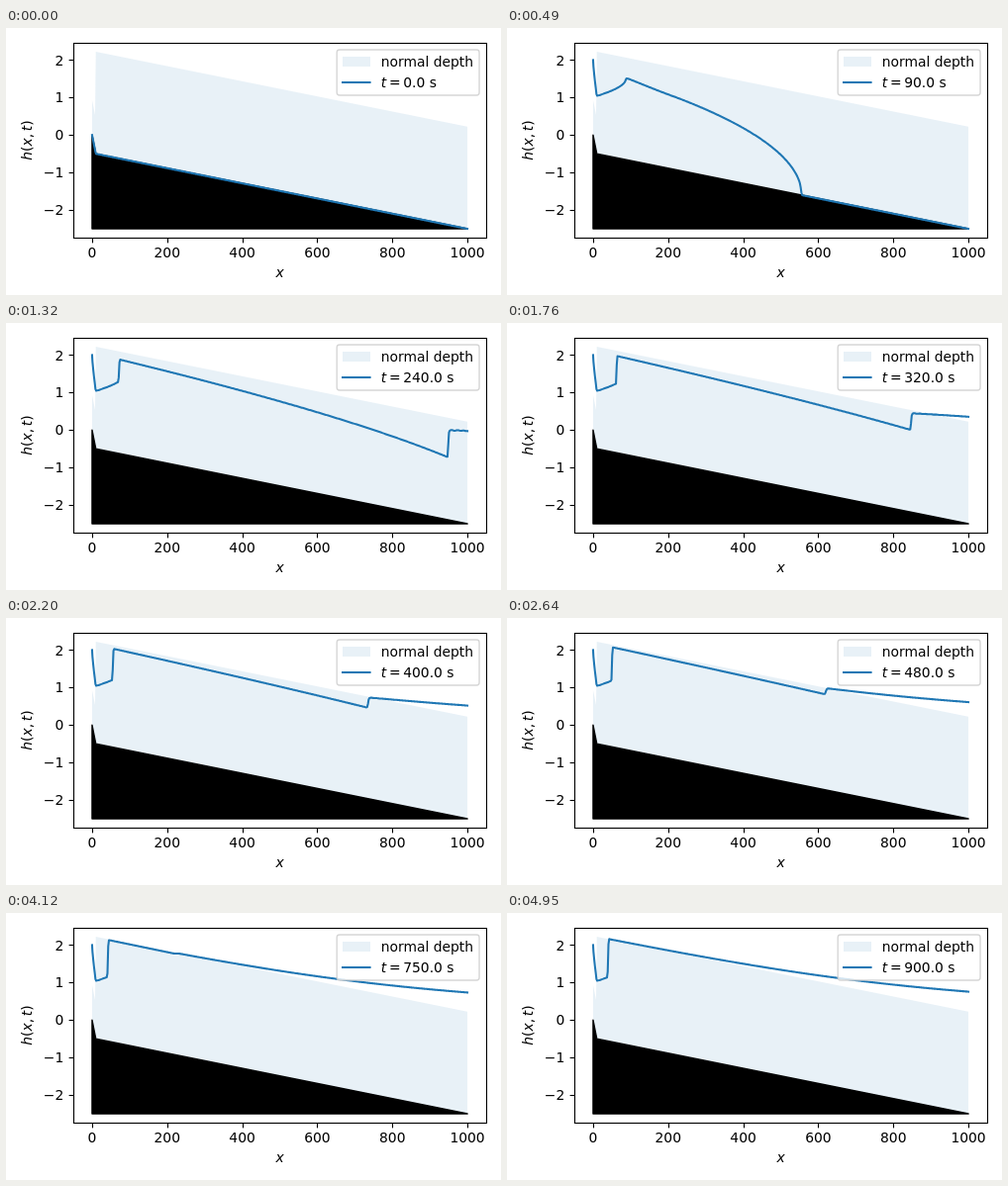
An HTML page with a canvas for the animation above (5010 ms loop, 500x270 px).

```html
<!DOCTYPE html>
<html lang="en">
<head>
<meta charset="utf-8">
<title>Channel flow over a weir</title>
<style>
  html, body { margin: 0; width: 100%; height: 100%; overflow: hidden; background: #fff; }
  canvas, svg { position: absolute; left: 0; top: 0; display: block; }
  text { font: 13.89px "DejaVu Sans", sans-serif; fill: #000; white-space: pre; }
  .it { font-style: italic; }
</style>
</head>
<body>
<canvas id="plot" width="500" height="270"></canvas>
<svg id="labels" width="500" height="270" viewBox="0 0 500 270"></svg>
<script>
// Shallow-water flow in a sloping channel, solved once at start-up
const G = 9.81, DRAG = 0.004, INFLOW = { h: 2, u: 5 }, WEIR = 0.5;
const LENGTH = 1000, CELLS = 500, DX = LENGTH / CELLS, DRY = 1e-5;
const KINK = 10, STEEP = 0.05, MILD = 2 / 990;
const FRAMES = 91, FRAME_STEP = 10, LOOP = 5010;

const bed = x => x < KINK ? -STEEP * x : -0.5 - MILD * (x - KINK);
const centre = i => (i + 0.5) * DX;
const slopeAt = Array.from({ length: CELLS }, (_, i) => centre(i) < KINK ? STEEP : MILD);
const normalDepth = slope => Math.cbrt(DRAG * (INFLOW.h * INFLOW.u) ** 2 / (G * slope));
const vanLeer = (a, b) => a * b > 0 ? 2 * a * b / (a + b) : 0;

const array = n => new Float64Array(n);
const u = array(CELLS), dh = array(CELLS), du = array(CELLS);
const massFlux = array(CELLS + 1), momFlux = array(CELLS + 1);

function setFlux(i, h, v) {
  massFlux[i] = h * v;
  momFlux[i] = h * v * v + G * h * h / 2;
}

function hllFlux(i, hL, uL, hR, uR) {
  if (hL < DRY && hR < DRY) return setFlux(i, 0, 0);
  const cL = Math.sqrt(G * hL), cR = Math.sqrt(G * hR);
  const sL = Math.min(uL - cL, uR - cR);
  const sR = hR < DRY ? uL + 2 * cL : Math.max(uL + cL, uR + cR);
  if (sL >= 0) return setFlux(i, hL, uL);
  if (sR <= 0) return setFlux(i, hR, uR);
  const qL = hL * uL, qR = hR * uR;
  const pL = qL * uL + G * hL * hL / 2, pR = qR * uR + G * hR * hR / 2;
  massFlux[i] = (sR * qL - sL * qR + sL * sR * (hR - hL)) / (sR - sL);
  momFlux[i] = (sR * pL - sL * pR + sL * sR * (qR - qL)) / (sR - sL);
}

// Critical flow over the weir, matched to the outgoing characteristic
function outletFlux(h, v) {
  const r = v + 2 * Math.sqrt(G * h);
  if (h < DRY || r <= 0) return setFlux(CELLS, 0, 0);
  let lo = r * r / (9 * G), hi = r * r / (4 * G);
  for (let k = 0; k < 26; k++) {
    const mid = (lo + hi) / 2, um = r - 2 * Math.sqrt(G * mid);
    const head = Math.max(0, mid + um * um / (2 * G) - WEIR);
    if (mid * um > Math.sqrt(G) * (2 * head / 3) ** 1.5) lo = mid; else hi = mid;
  }
  setFlux(CELLS, lo, r - 2 * Math.sqrt(G * lo));
}

function euler(h, q, dt, hNew, qNew) {
  for (let i = 0; i < CELLS; i++) u[i] = h[i] > DRY ? q[i] / h[i] : 0;
  dh[0] = vanLeer(h[0] - INFLOW.h, h[1] - h[0]);
  du[0] = vanLeer(u[0] - INFLOW.u, u[1] - u[0]);
  for (let i = 1; i < CELLS - 1; i++) {
    dh[i] = vanLeer(h[i] - h[i - 1], h[i + 1] - h[i]);
    du[i] = vanLeer(u[i] - u[i - 1], u[i + 1] - u[i]);
  }
  setFlux(0, INFLOW.h, INFLOW.u);
  for (let i = 1; i < CELLS; i++) {
    hllFlux(i, h[i - 1] + dh[i - 1] / 2, u[i - 1] + du[i - 1] / 2, h[i] - dh[i] / 2, u[i] - du[i] / 2);
  }
  outletFlux(h[CELLS - 1], u[CELLS - 1]);
  for (let i = 0; i < CELLS; i++) {
    const depth = Math.max(0, h[i] - dt / DX * (massFlux[i + 1] - massFlux[i]));
    const flow = q[i] - dt / DX * (momFlux[i + 1] - momFlux[i]) + dt * G * h[i] * slopeAt[i];
    hNew[i] = depth;
    qNew[i] = depth > DRY ? flow / (1 + dt * DRAG * Math.abs(flow) / (depth * depth)) : 0;
  }
}

function solve() {
  const h = array(CELLS), q = array(CELLS);
  const h1 = array(CELLS), q1 = array(CELLS), h2 = array(CELLS), q2 = array(CELLS);
  const depths = [h.slice()];
  for (let f = 1; f < FRAMES; f++) {
    let left = FRAME_STEP;
    while (left > 1e-9) {
      let speed = 10;
      for (let i = 0; i < CELLS; i++) {
        if (h[i] > DRY) speed = Math.max(speed, Math.abs(q[i] / h[i]) + Math.sqrt(G * h[i]));
      }
      const dt = Math.min(left, 0.42 * DX / speed);
      euler(h, q, dt, h1, q1);
      euler(h1, q1, dt, h2, q2);
      for (let i = 0; i < CELLS; i++) {
        h[i] = (h[i] + h2[i]) / 2;
        q[i] = (q[i] + q2[i]) / 2;
      }
      left -= dt;
    }
    depths.push(h.slice());
  }
  return depths;
}

// Plot
const ctx = document.getElementById("plot").getContext("2d");
const labels = document.getElementById("labels");
const BLUE = "#1f77b4", PALE = "rgba(31,119,180,0.1)";
const AXES = { left: 68, top: 15, right: 485, bottom: 212 };
const X = x => 86.95 + 0.3791 * x;
const Y = v => 203.05 - 37.93 * (v + 2.5);
const snap = p => Math.floor(p + 0.5) + 0.5;

function label(str, x, y, anchor = "start", italic = false, parent = labels) {
  const t = document.createElementNS("http://www.w3.org/2000/svg", "text");
  t.setAttribute("x", x);
  t.setAttribute("y", y);
  t.setAttribute("text-anchor", anchor);
  if (italic) t.setAttribute("class", "it");
  t.textContent = str;
  parent.appendChild(t);
  return t;
}

function path(points) {
  ctx.beginPath();
  for (const [x, v] of points) ctx.lineTo(X(x), Y(v));
}

function segment(x1, y1, x2, y2) {
  ctx.beginPath();
  ctx.moveTo(x1, y1);
  ctx.lineTo(x2, y2);
  ctx.stroke();
}

const xTicks = [0, 200, 400, 600, 800, 1000], yTicks = [-2, -1, 0, 1, 2];
const bedLine = [[0, 0], [KINK, -0.5], [LENGTH, -2.5]];
const steepDepth = normalDepth(STEEP), mildDepth = normalDepth(MILD);
const normalArea = [
  [0, steepDepth], [8, bed(8) + steepDepth], [KINK, bed(KINK) + mildDepth],
  [LENGTH, bed(LENGTH) + mildDepth], ...bedLine.slice().reverse()
];

xTicks.forEach(x => label(x, X(x), 232, "middle"));
yTicks.forEach(v => label(String(v).replace("-", "\u2212"), 58.3, Y(v) + 5.2, "end"));
label("x", 276.5, 252, "middle", true);
const yTitle = document.createElementNS("http://www.w3.org/2000/svg", "g");
yTitle.setAttribute("transform", "translate(26.3 133.7) rotate(-90)");
labels.appendChild(yTitle);
[["h", 0], ["(", 8.81], ["x", 14.23], [",", 22.45], ["t", 29.57], [")", 35.02]]
  .forEach(([s, x]) => label(s, x, 0, "start", /[a-z]/.test(s), yTitle));
label("normal depth", 378.7, 39);
label("t", 378.7, 60, "start", true);
label("=", 386.9, 60);
const clock = label("", 401.2, 60);

function drawAxes() {
  ctx.strokeStyle = "#000";
  ctx.lineWidth = 1.11;
  ctx.strokeRect(AXES.left + 0.5, AXES.top + 0.5, AXES.right - AXES.left, AXES.bottom - AXES.top);
  xTicks.forEach(x => segment(snap(X(x)), 212.5, snap(X(x)), 217.4));
  yTicks.forEach(v => segment(63.6, snap(Y(v)), 68.5, snap(Y(v))));
}

function drawLegend() {
  ctx.beginPath();
  ctx.roundRect(334.2, 21.95, 143.85, 46.1, 2.78);
  ctx.fillStyle = "rgba(255,255,255,0.8)";
  ctx.fill();
  ctx.strokeStyle = "rgba(204,204,204,0.8)";
  ctx.lineWidth = 1.39;
  ctx.stroke();
  ctx.fillStyle = PALE;
  ctx.fillRect(340, 29, 28, 10);
  ctx.strokeStyle = BLUE;
  ctx.lineWidth = 2.08;
  segment(339, 55, 368.6, 55);
}

function surface(depth, frame) {
  const points = Array.from(depth, (h, i) => [centre(i), bed(centre(i)) + h]);
  const a = points[CELLS - 2][1], b = points[CELLS - 1][1];
  return [[0, frame ? INFLOW.h : 0], ...points, [LENGTH, Math.max(bed(LENGTH), b + (b - a) / 2)]];
}

function draw(frame) {
  ctx.fillStyle = "#fff";
  ctx.fillRect(0, 0, 500, 270);

  path(normalArea);
  ctx.fillStyle = PALE;
  ctx.fill();

  path([...bedLine, [0, -2.5]]);
  ctx.closePath();
  ctx.fillStyle = ctx.strokeStyle = "#000";
  ctx.lineWidth = 1.39;
  ctx.lineJoin = "round";
  ctx.fill();
  ctx.stroke();

  path(surface(depths[frame], frame));
  ctx.strokeStyle = BLUE;
  ctx.lineWidth = 2.08;
  ctx.lineCap = "square";
  ctx.stroke();
  ctx.lineCap = "butt";
  ctx.lineJoin = "miter";

  drawAxes();
  drawLegend();
  clock.textContent = (frame * FRAME_STEP).toFixed(1) + " s";
}

// Frames alternate between 50 and 60 ms
function frameAt(ms) {
  const pair = Math.floor(ms / 110);
  return Math.min(FRAMES - 1, 2 * pair + (ms - 110 * pair >= 50 ? 1 : 0));
}

const depths = solve();
const start = performance.now();
let shown = -1;

function tick() {
  const frame = frameAt((performance.now() - start) % LOOP);
  if (frame !== shown) draw(shown = frame);
  requestAnimationFrame(tick);
}
tick();
</script>
</body>
</html>
```
